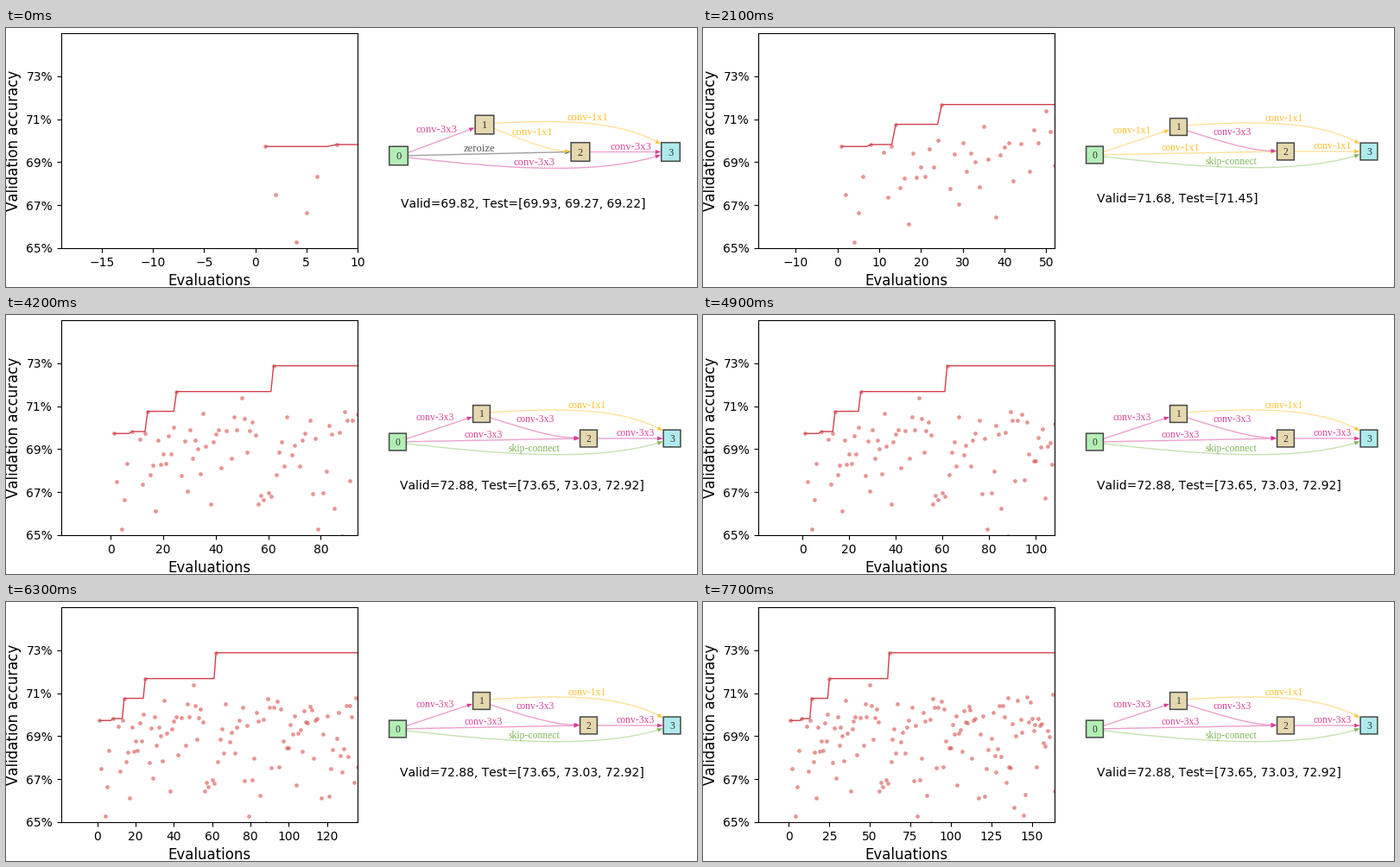
A matplotlib script for the animation above (8000 ms loop, 800x300 px).

```python
import matplotlib.pyplot as plt
import numpy as np
from matplotlib.animation import FuncAnimation
from matplotlib.patches import PathPatch, Polygon, Rectangle
from matplotlib.path import Path

plt.rcParams["font.family"] = "DejaVu Sans"
plt.rcParams["text.kerning_factor"] = 6

W, H, DPI = 800, 300, 100
LOOP, TICK, HOLD = 8000, 50, 350
PX = 72 / DPI

# The search opens with these scores, then sets a few records.
OPENING = [69.73, 67.47, 64, 65.3, 66.63, 68.32, 64, 69.82, 64, 64]
RECORDS = {14: 70.76, 25: 71.68, 62: 72.88}
TOTAL = 164


def run_search():
    rng = np.random.default_rng(7)
    strong = rng.normal(69.8, 0.8, TOTAL)
    weak = rng.uniform(63, 69, TOTAL)
    scores = np.where(rng.random(TOTAL) < 0.62, strong, weak)
    ceiling = np.full(TOTAL, max(OPENING))
    for n, record in RECORDS.items():
        ceiling[n - 1:] = record
    scores = ceiling - abs(ceiling - scores)
    scores[:len(OPENING)] = OPENING
    for n, record in RECORDS.items():
        scores[n - 1] = record
    return scores


evals = np.arange(1, TOTAL + 1)
scores = run_search()
best = np.maximum.accumulate(scores)

# text, line and arrow colours of each operation
OPS = {
    "conv-3x3": ("#da4699", "#eda0cd", "#dc3a92"),
    "conv-1x1": ("#fbc02d", "#ffe299", "#fcc63c"),
    "skip-connect": ("#82b858", "#c6e2b0", "#7fb655"),
    "zeroize": ("#555555", "#a0a0a0", "#444444"),
}
FILLS = ["#b3efb5", "#e6d8ae", "#e6d8ae", "#aeebee"]

# nodes, y shift at the start and the end, bow, label offset from the middle
EDGES = [
    (0, 1, -3.7, 3.5, 0, (-7, -12.2)),
    (0, 2, -0.2, 0, 0, (-15, -6.4)),
    (0, 3, 2, 3.5, 18, (-6, -7)),
    (1, 2, 4.5, -0.7, 5, (-2, -14.5)),
    (1, 3, -1.7, -9, -17, (8, -7)),
    (2, 3, 0, 0, 0, (4.5, -6.4)),
]
WIDE = dict(box=21.6, font=12.6, text=(457, 208),
            nodes=[(454.5, 148), (554, 112), (665, 143.5), (769.5, 143.5)])
SLIM = dict(box=19.8, font=11.6, text=(456, 202),
            nodes=[(453.5, 147), (550.5, 114.5), (674.5, 143), (771, 143)])

C1, C3, SKIP, ZERO = "conv-1x1", "conv-3x3", "skip-connect", "zeroize"
# evaluation that found it, layout, operations, test scores
FOUND = [
    (8, WIDE, [C3, ZERO, C3, C1, C1, C3], "69.93, 69.27, 69.22"),
    (14, SLIM, [C3, C1, SKIP, C1, C1, C1], "70.70"),
    (25, SLIM, [C1, C1, SKIP, C3, C1, C1], "71.45"),
    (62, SLIM, [C3, C3, SKIP, C3, C1, C3], "73.65, 73.03, 72.92"),
]

fig = plt.figure(figsize=(W / DPI, H / DPI), dpi=DPI, facecolor="white")
ax = fig.add_axes([0.0797, 0.15, 0.429, 0.83])
ax.set_ylim(65, 75)
ax.set_yticks(range(65, 75, 2), [f"{t}%" for t in range(65, 75, 2)])
ax.tick_params(labelsize=10)
ax.set_xlabel("Evaluations", fontsize=12)
ax.set_ylabel("Validation accuracy", fontsize=12)
ax.plot(evals, scores, "o", ms=3.4, mew=0, color="#d43c3c", alpha=0.55)
ax.plot(evals, best, color="#d1404c", lw=1)

stage = fig.add_axes([0, 0, 1, 1])
stage.set_xlim(0, W)
stage.set_ylim(H, 0)
stage.axis("off")


def serif(x, y, s, size, color):
    return stage.text(x, y + 0.33 * size, s, fontsize=size * PX, color=color,
                      family="Liberation Serif", ha="center", va="baseline")


def bend(start, tip, bow):
    """Control points of a cubic that leaves the straight line by bow."""
    pts = np.array([start + (tip - start) * f for f in (0, 0.33, 0.72, 1)])
    pts[1:3, 1] += bow * 2 / 3, bow * 4 / 3
    return pts


def arrow(pts, line, head):
    tip = pts[3]
    way = (tip - pts[2]) / np.hypot(*(tip - pts[2]))
    side = np.array([-way[1], way[0]]) * 2.4
    base = tip - way * 6.5
    curve = Path([*pts[:3], base], [Path.MOVETO] + [Path.CURVE4] * 3)
    return [
        stage.add_patch(PathPatch(curve, fc="none", ec=line, lw=1)),
        stage.add_patch(Polygon([tip, base + side, base - side], fc=head, lw=0)),
    ]


def cell(found, layout, ops, test):
    parts = []
    box, size = layout["box"], layout["font"]
    nodes = np.array(layout["nodes"])
    gap = box / 2 + 0.5
    for op, (a, b, leave, arrive, bow, offset) in zip(ops, EDGES):
        ink, line, head = OPS[op]
        pts = bend(nodes[a] + (gap, leave), nodes[b] + (-gap, arrive), bow)
        middle = (pts[0] + 3 * pts[1] + 3 * pts[2] + pts[3]) / 8
        parts += arrow(pts, line, head)
        parts.append(serif(*(middle + offset), op, size, ink))
    for i, (x, y) in enumerate(nodes):
        parts.append(stage.add_patch(Rectangle(
            (x - box / 2, y - box / 2), box, box,
            fc=FILLS[i], ec="#484848", lw=1.1, snap=False)))
        parts.append(serif(x, y, str(i), size, "#333333"))
    label = f"Valid={scores[found - 1]:.2f}, Test=[{test}]"
    parts.append(stage.text(*layout["text"], label, fontsize=10, va="baseline"))
    return parts


cells = [(spec[0], cell(*spec)) for spec in FOUND]


def update(i):
    count = 10 + 7 * (i * TICK // HOLD)
    ax.set_xlim(-19, count)
    current = max(n for n, _ in cells if n <= count)
    for n, parts in cells:
        for p in parts:
            p.set_visible(n == current)
    return []


anim = FuncAnimation(fig, update, frames=LOOP // TICK, interval=TICK,
                     init_func=lambda: update(0), repeat=True, repeat_delay=0)
plt.show()
```
